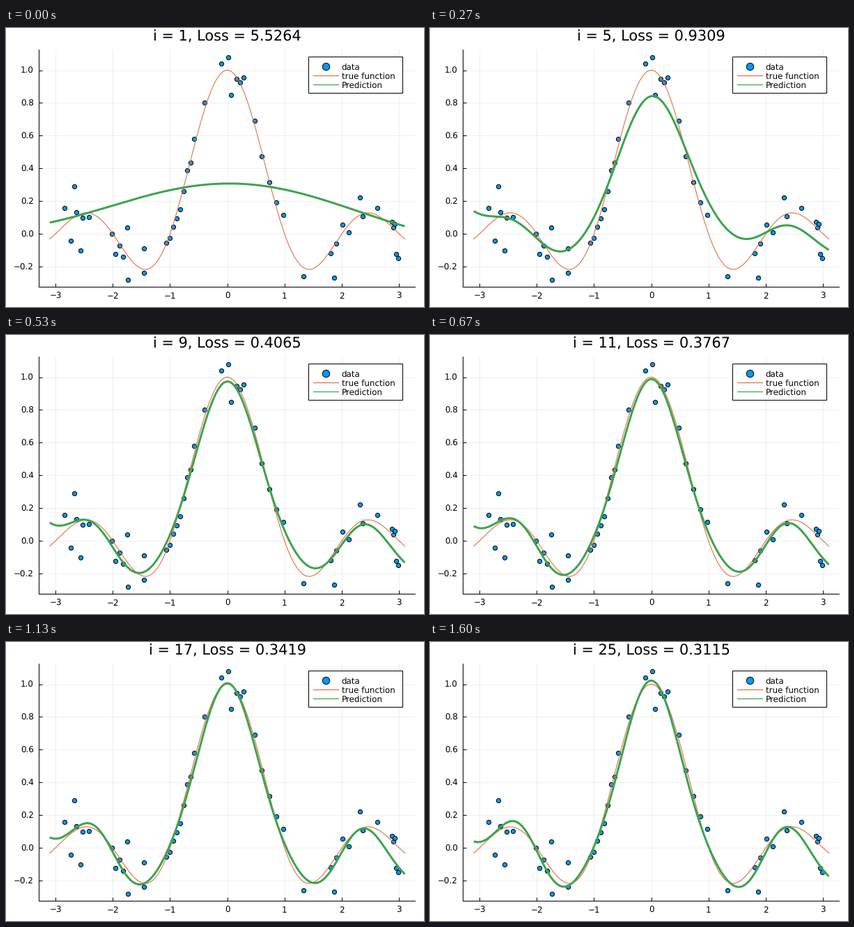
Write a matplotlib script that moves like this. It is 600 by 400 pixels and loops after 1.67 s.

```python
import numpy as np
import matplotlib.pyplot as plt
from matplotlib.animation import FuncAnimation
from matplotlib.patches import Rectangle

W, H, DPI = 600, 400, 100
PX = 72 / DPI                       # points per pixel
BLUE, ORANGE, GREEN = "#009af9", "#e26f46", "#3da44d"
LEFT, RIGHT, TOP, BOTTOM = 47.4, 587.4, 30.5, 371.3
X0, Y0, X_UNIT, Y_UNIT = 317.6, 295.1, 82.2, 234.6    # origin and scale
STEPS, TICK_MS, TICKS = 25, 10, 167
EDGE = 3.1

plt.rcParams["font.family"] = "DejaVu Sans"
plt.rcParams["text.hinting"] = "none"


def noisy_samples():
    """Dots strewn near the true function, plus the stray ones."""
    rng = np.random.default_rng(3)
    runs = [(-2.84, -2.42, 5), (-2.02, -1.75, 5), (-1.07, -.58, 9),
            (.16, .28, 3), (.48, .98, 5), (1.8, 2.12, 4), (2.37, 2.62, 2),
            (2.87, 2.95, 4)]
    strays = [(-2.67, .29), (-2.56, -.10), (-1.73, -.28), (-1.45, -.24),
              (-1.45, -.09), (-.40, .80), (-.10, 1.04), (.02, 1.08),
              (.07, .85), (1.33, -.26), (1.87, -.27), (2.32, .22),
              (2.99, -.15)]
    xs = np.concatenate([np.linspace(*run) for run in runs])
    ys = np.sinc(xs) + rng.normal(0, .05, len(xs))
    return np.vstack([np.column_stack([xs, ys]), strays])


x = np.linspace(-EDGE, EDGE, 400)
tail = x / EDGE
truth = np.sinc(x)

# The fit starts as a broad hump and ends as the truth plus a ripple
STAGES = [1, 3, 7, 25]
curves = np.array([
    .154 * (1 + np.cos(.726 * (x - .12))) - .007 * x,
    .67 * np.exp(-(x / 1.05)**2) + .09 * np.sin(1.42 * x)
    + .04 * tail**4 - .02 * tail**7,
    truth - .0625 * np.cos(2.6 * x) + .021 * np.cos(5.2 * x)
    + .02 * np.sin(x) + .045 * tail**4 - .128 * tail**7,
    truth - .016 + .038 * np.cos(5.4 * x) - .107 * tail**7,
])

# Loss falls geometrically between a few milestones
milestones = {1: 5.5264, 3: 1.9754, 7: .4387, 11: .3767, 15: .3505,
              21: .3252, 25: .3115}
loss = np.exp(np.interp(np.arange(1, STEPS + 1), list(milestones),
                        np.log(list(milestones.values()))))
error = np.sqrt(loss)
stage_error = np.array([error[i - 1] for i in STAGES])


def prediction(step):
    """Blend neighbouring stages according to the remaining error."""
    pos = np.interp(-error[step], -stage_error, np.arange(len(STAGES)))
    k = min(int(pos), len(STAGES) - 2)
    return curves[k] + (pos - k) * (curves[k + 1] - curves[k])


fig = plt.figure(figsize=(W / DPI, H / DPI), dpi=DPI, facecolor="white")


def label(px, py, text, size=11.9, **kw):
    return fig.text(px / W, 1 - py / H, text, fontsize=size * PX,
                    color="black", va="baseline", **kw)


def signed(text):
    return text.replace("-", "\u2212")


ax = fig.add_axes([LEFT / W, 1 - BOTTOM / H,
                   (RIGHT - LEFT) / W, (BOTTOM - TOP) / H])
ax.set_xlim((LEFT - X0) / X_UNIT, (RIGHT - X0) / X_UNIT)
ax.set_ylim((Y0 - BOTTOM) / Y_UNIT, (Y0 - TOP) / Y_UNIT)
x_ticks, y_ticks = range(-3, 4), np.arange(-1, 6) / 5
ax.set_xticks(x_ticks)
ax.set_yticks(y_ticks)
ax.tick_params(direction="in", length=5 * PX, width=PX,
               labelbottom=False, labelleft=False)
ax.grid(color="black", alpha=.1, linewidth=.6 * PX)
ax.set_axisbelow(True)
ax.spines[["top", "right"]].set_visible(False)
ax.spines[["left", "bottom"]].set_linewidth(PX)

for v in x_ticks:
    label(X0 + X_UNIT * v, 387.6, signed(f"{v}"), ha="center")
for v in y_ticks:
    label(39.8, Y0 - Y_UNIT * v + 4.4, signed(f"{v:.1f}"), ha="right")

dot = dict(marker="o", linestyle="none", markerfacecolor=BLUE,
           markeredgecolor="black", markeredgewidth=PX)
ax.plot(*noisy_samples().T, markersize=6.2 * PX, zorder=2, **dot)
ax.plot(x, truth, color=ORANGE, linewidth=1.1 * PX, zorder=3)
fit, = ax.plot(x, prediction(0), color=GREEN, linewidth=3 * PX, zorder=4,
               solid_capstyle="butt")

# Legend, laid out in pixels
key = fig.add_axes([0, 0, 1, 1])
key.set(xlim=(0, W), ylim=(H, 0))
key.axis("off")
key.add_patch(Rectangle((434.4, 41.4), 135, 52, facecolor="white",
                        edgecolor="black", linewidth=PX))
key.plot(458.5, 54.8, markersize=10.4 * PX, **dot)
for row, color in ((1, ORANGE), (2, GREEN)):
    y = 55 + 13 * row
    key.plot([440.5, 476.5], [y, y], color=color, linewidth=1.2 * PX)
for row, name in enumerate(["data", "true function", "Prediction"]):
    label(481.8, 59.4 + 13 * row, name)

title = label(317.5, 18.5, "", size=20.9, ha="center")


def update(tick):
    step = min(int((tick + .5) * STEPS / TICKS), STEPS - 1)
    fit.set_ydata(prediction(step))
    title.set_text(f"i = {step + 1}, Loss = {loss[step]:.4f}")
    return fit, title


anim = FuncAnimation(fig, update, frames=TICKS, interval=TICK_MS,
                     repeat=True, repeat_delay=0)
plt.show()
```
